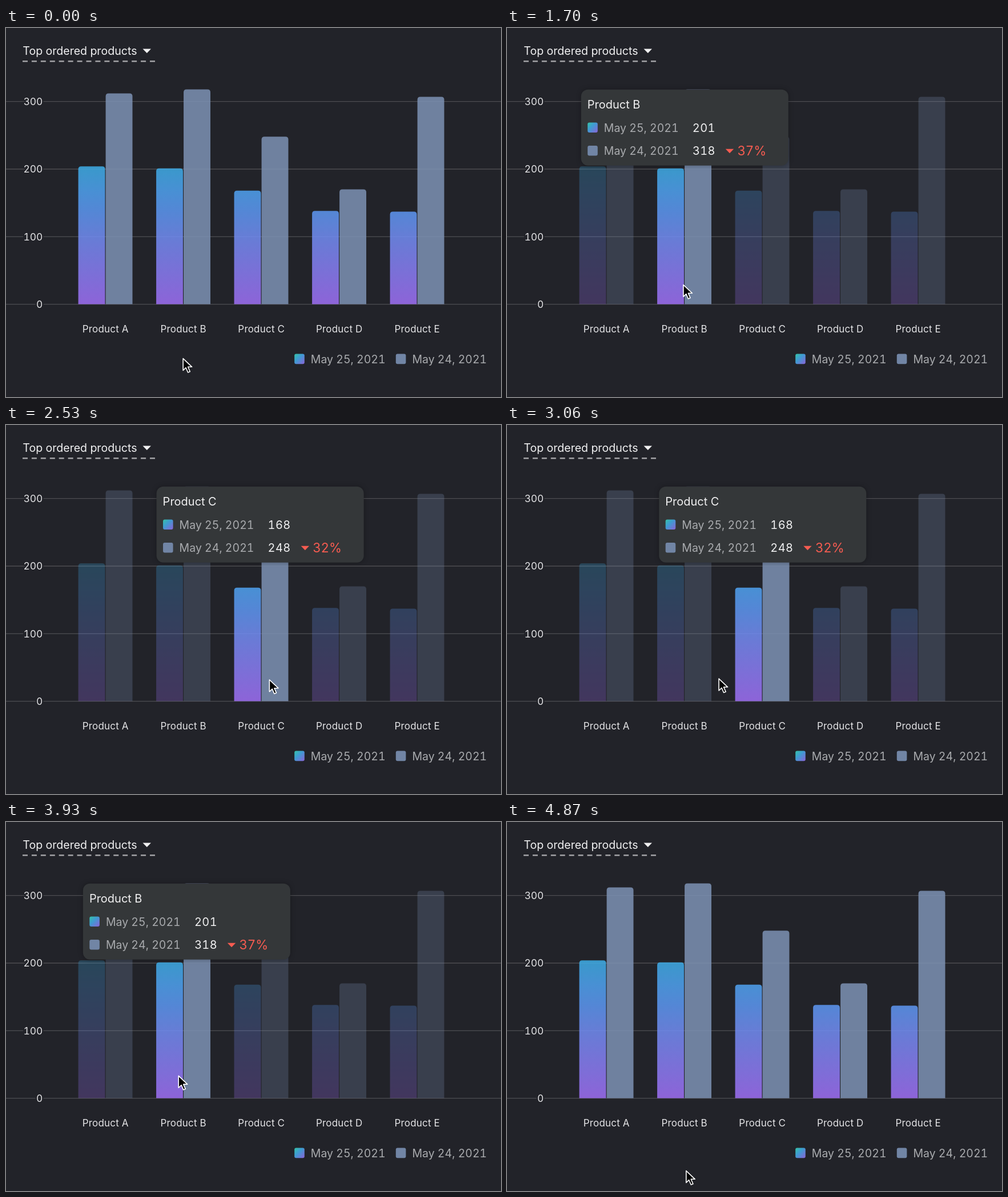
An HTML page that plays this animation: 867x646 px, repeating every 5.17 s.

```html
<!DOCTYPE html>
<html lang="en">
<head>
<meta charset="utf-8">
<title>Top ordered products</title>
<style>
  html, body { margin: 0; width: 100%; height: 100%; overflow: hidden; background: #222329; }
  svg { display: block; width: 867px; height: 646px; }
  text { font-family: Inter, Roboto, "Liberation Sans", sans-serif; font-variant-numeric: tabular-nums; fill: #f0f0f1; }
  .title { font-size: 19.6px; }
  .tick { font-size: 17.4px; text-anchor: end; fill: #e4e4e6; stroke: #222329; stroke-width: 5px; paint-order: stroke; }
  .cat { font-size: 17px; letter-spacing: .2px; text-anchor: middle; fill: #e4e4e6; }
  .date { font-size: 19.5px; fill: #a9abae; }
  .name { font-size: 20px; }
  .value { font-size: 20px; letter-spacing: .4px; }
  .drop { font-size: 22.4px; fill: #f65c51; }
</style>
</head>
<body>
<svg id="stage" viewBox="0 0 867 646" xmlns="http://www.w3.org/2000/svg">
  <defs>
    <linearGradient id="barFill" gradientUnits="userSpaceOnUse" x1="0" y1="242" x2="0" y2="484">
      <stop offset="0" stop-color="#3daee7"/>
      <stop offset=".18" stop-color="#4fa3f2"/>
      <stop offset=".33" stop-color="#5d98f4"/>
      <stop offset=".51" stop-color="#728df4"/>
      <stop offset="1" stop-color="#a06ff7"/>
    </linearGradient>
    <linearGradient id="keyFill" x1="0" y1="0" x2="1" y2="1">
      <stop offset="0" stop-color="#35c3a6"/>
      <stop offset=".42" stop-color="#3f9bd2"/>
      <stop offset="1" stop-color="#8a63d8"/>
    </linearGradient>
  </defs>
  <rect width="867" height="646" fill="#222329"/>
  <text class="title" x="29.3" y="46.6">Top ordered products</text>
  <path d="M239.5 36.5h14.5l-7.2 7.5z" fill="#f0f0f1"/>
  <path d="M29 58.2H261" stroke="#a2a2a5" stroke-width="2.4" stroke-dasharray="9 6.93"/>
  <g id="grid"></g>
  <g id="bars"></g>
  <g id="legend"></g>
  <g id="tip">
    <rect y="107.8" width="363" height="133" rx="12" fill="#343739" style="filter:drop-shadow(0 0 4px rgba(0,0,0,.3))"/>
    <text class="name" id="tipName" x="11" y="140.6"></text>
    <g id="tipKeys"></g>
    <text class="value" id="tipNow" x="195" y="181.6"></text>
    <text class="value" id="tipPast" x="195" y="222.3"></text>
    <path d="M253 211.7h14.4l-7.2 7.6z" fill="#f65c51"/>
    <text class="drop" id="tipDrop" x="273.4" y="223.3"></text>
  </g>
  <path id="cursor" d="M.8 1.6V22.4L5.7 17.7L9.3 26L12.9 24.5L9.3 16.3H16.3Z" fill="#000" stroke="#fff" stroke-width="1.6" stroke-linejoin="round"/>
</svg>
<script>
const NS = 'http://www.w3.org/2000/svg';
const byId = id => document.getElementById(id);

const LOOP = 5170, STEP = 58.7, LAST = 83;
const BASE = 483.6, UNIT = 1.183, PITCH = 136.5, BAR = 46.9;
const TIP_W = 363, GLIDE = 102;
const DATES = ['May 25, 2021', 'May 24, 2021'];
const FILLS = ['url(#keyFill)', '#7185a5'];
const data = [
  { name: 'Product A', now: 204, past: 312 },
  { name: 'Product B', now: 201, past: 318 },
  { name: 'Product C', now: 168, past: 248 },
  { name: 'Product D', now: 138, past: 170 },
  { name: 'Product E', now: 137, past: 307 }
];

function add(parent, tag, attrs, text) {
  const el = document.createElementNS(NS, tag);
  for (const key in attrs) el.setAttribute(key, attrs[key]);
  if (text) el.textContent = text;
  parent.appendChild(el);
  return el;
}

function addKey(parent, i, x, y) {
  add(parent, 'rect', { x, y, width: 17.6, height: 17.6, rx: 3, fill: FILLS[i] });
  add(parent, 'text', { class: 'date', x: x + 28.6, y: y + 16.1 }, DATES[i]);
}

function addBar(parent, x, value, fill) {
  const top = BASE - value * UNIT, r = 5;
  const d = `M${x} ${BASE}V${top + r}q0 ${-r} ${r} ${-r}h${BAR - 2 * r}q${r} 0 ${r} ${r}V${BASE}z`;
  add(parent, 'path', { d, fill, 'fill-opacity': .85 });
}

const center = i => 174 + PITCH * i;

for (const v of [0, 100, 200, 300]) {
  const y = BASE - v * UNIT;
  add(byId('grid'), 'path', { d: `M0 ${y}H867`, stroke: '#4c4d51', 'stroke-width': 1.3 });
  add(byId('grid'), 'text', { class: 'tick', x: 64.3, y: y + 6.3 }, String(v));
}

const groups = data.map((item, i) => {
  const g = add(byId('bars'), 'g', {});
  addBar(g, center(i) - 47.4, item.now, 'url(#barFill)');
  addBar(g, center(i) + .6, item.past, '#7d92b4');
  add(byId('grid'), 'text', { class: 'cat', x: center(i) + .2, y: 532.6 }, item.name);
  return g;
});

DATES.forEach((_, i) => {
  addKey(byId('legend'), i, 505.2 + 177.6 * i, 570.6);
  addKey(byId('tipKeys'), i, 11.4, 165.4 + 40.6 * i);
});

const smooth = p => p * p * (3 - 2 * p);
const speedUp = p => p * p;

// step, x, y, easing towards this point
const path = [
  [0, 309.4, 577, smooth],
  [10, 306.2, 458, smooth],
  [14, 306.2, 448, smooth],
  [28, 306.2, 448, smooth],
  [37, 460.6, 444.4, speedUp],
  [46, 460.6, 444.4, smooth],
  [53, 365, 442.4, smooth],
  [60, 362, 441.4, smooth],
  [62, 302.6, 440, smooth],
  [65, 301.5, 441, smooth],
  [74, 301, 455.4, smooth],
  [LAST, 313, 609, smooth]
];

function cursorAt(k) {
  const n = Math.max(1, path.findIndex(p => p[0] >= k));
  const a = path[n - 1], b = path[n];
  const e = b[3]((k - a[0]) / (b[0] - a[0]));
  return [a[1] + (b[1] - a[1]) * e, a[2] + (b[2] - a[2]) * e];
}

function tipCenter(ms) {
  const left = from => Math.exp(-(ms - from) / GLIDE);
  if (ms < 2123) return center(1);
  if (ms < 3597.5) return center(2) - PITCH * left(2123);
  return center(1) + PITCH * left(3597.5);
}

function hovered(k) {
  if (k < 7 || k >= 77) return -1;
  return k >= 37 && k < 62 ? 2 : 1;
}

function draw(t) {
  const k = Math.min(LAST, Math.floor((t + 8) / STEP));
  const active = hovered(k);
  groups.forEach((g, i) => g.setAttribute('opacity', active < 0 || i === active ? 1 : .3));

  const item = data[active < 0 ? 1 : active];
  const shown = k < 7 ? 0 : Math.max(0, Math.min(1, (82 - k) / 4));
  byId('tip').setAttribute('opacity', shown);
  byId('tip').setAttribute('transform', `translate(${tipCenter(k * STEP) - TIP_W / 2 + .8} 0)`);
  byId('tipName').textContent = item.name;
  byId('tipNow').textContent = item.now;
  byId('tipPast').textContent = item.past;
  byId('tipDrop').textContent = Math.round((1 - item.now / item.past) * 100) + '%';

  const [x, y] = cursorAt(k);
  byId('cursor').setAttribute('transform', `translate(${x} ${y})`);
}

const start = performance.now();
function tick() {
  draw((performance.now() - start) % LOOP);
  requestAnimationFrame(tick);
}
tick();
</script>
</body>
</html>
```
